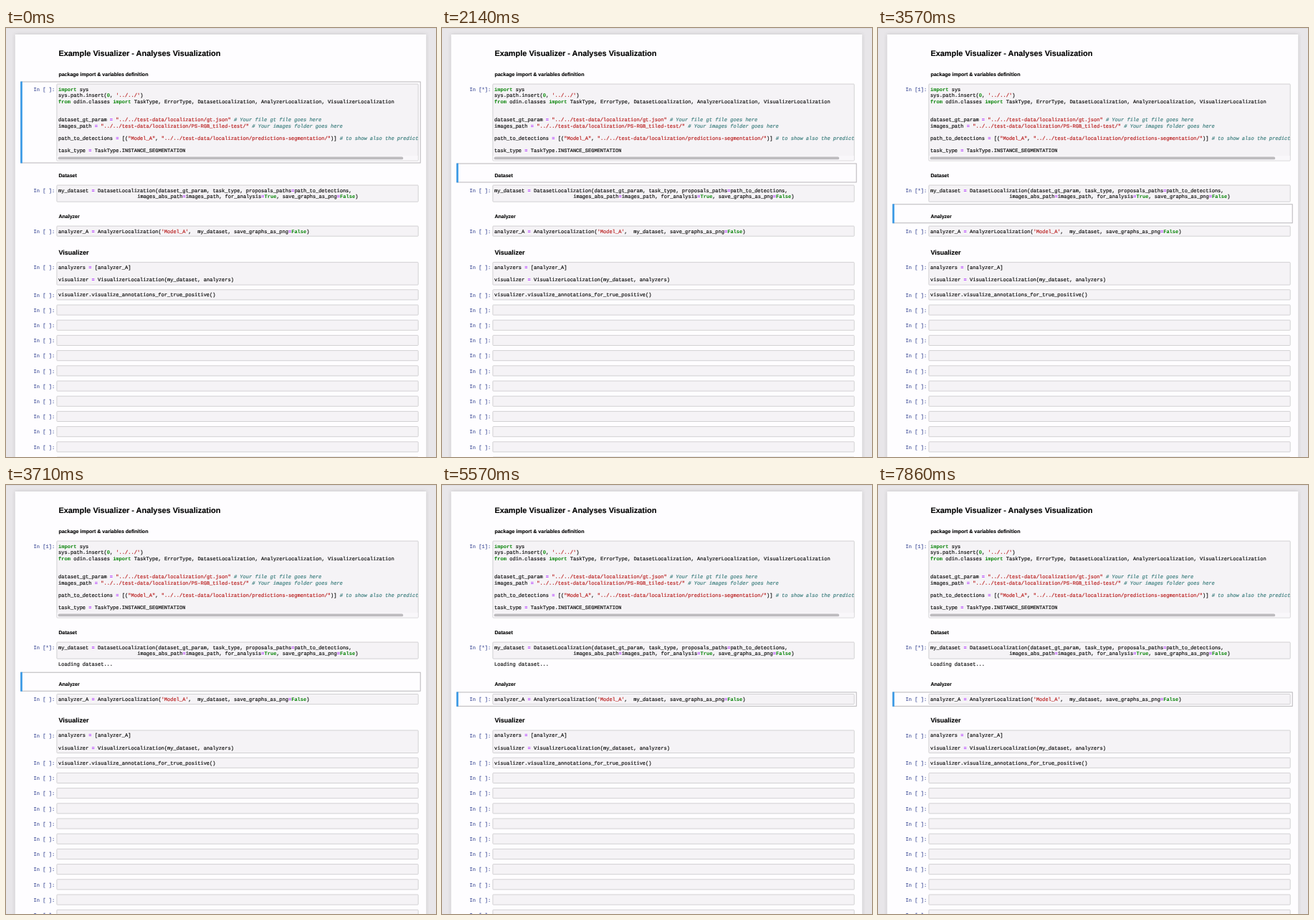
Recreate the animation shown at these times as an HTML page. Size 600 by 598 pixels, loop 8 s.

```html
<!DOCTYPE html>
<html lang="en">
<head>
<meta charset="utf-8">
<title>Notebook</title>
<style>
html, body { margin: 0; width: 100%; height: 100%; overflow: hidden; background: #e8e6e9; }
svg { display: block; width: 600px; height: 598px; }
text { white-space: pre; text-rendering: geometricPrecision; font-kerning: none; }
.code { font: 7.04px "Liberation Mono", monospace; fill: #111; stroke: #111; stroke-width: .2px; }
.prompt { fill: #303f8f; stroke: #303f8f; stroke-width: .08px; }
.head { font: bold 7.04px "Liberation Sans", sans-serif; fill: #000; stroke: #000; stroke-width: .12px; }
.kw { fill: #008000; stroke: none; font-weight: bold; }
.op { fill: #a2f; stroke: none; font-weight: bold; }
.num { fill: #080; stroke: #080; }
.str { fill: #ba2121; stroke: #ba2121; }
.com { fill: #408080; stroke: #408080; font-style: italic; }
.box { fill: #f5f3f6; stroke: #cfcdd0; stroke-width: .9px; }
.frame { fill: #fefdff; stroke: #b0aeb1; stroke-width: .9px; }
.bar { fill: #3b9ae6; stroke: #3b9ae6; stroke-width: .9px; }

.anim { animation: 8s step-end infinite; }
.frame.anim, .bar.anim { animation-name: select; }
.star1 { animation-name: star1; }
.done1 { animation-name: done1; }
.star2 { animation-name: star2; }
.output { animation-name: output; }
.below { animation-name: push; }

@keyframes select {
  0% { y: 75px; height: 113px; }
  23.2% { y: 189px; height: 26px; }
  32.1% { y: 216px; height: 29.4px; }
  37.4% { y: 245.8px; height: 26px; }
  46.3% { y: 261.2px; height: 26px; }
  64.2%, 100% { y: 288.9px; height: 19.4px; }
}
@keyframes star1 { 0% { opacity: 0; } 23.2% { opacity: 1; } 44%, 100% { opacity: 0; } }
@keyframes done1 { 0% { opacity: 0; } 44%, 100% { opacity: 1; } }
@keyframes star2 { 0% { opacity: 0; } 37.4%, 100% { opacity: 1; } }
@keyframes output { 0% { opacity: 0; } 46.3%, 100% { opacity: 1; } }
@keyframes push { 0% { transform: none; } 46.3%, 100% { transform: translateY(15.4px); } }
</style>
</head>
<body>
<svg viewBox="0 0 600 598">
  <defs>
    <filter id="shadow" x="-5%" y="-5%" width="110%" height="110%">
      <feDropShadow dx="0" dy="0" stdDeviation="2.2" flood-color="#575757" flood-opacity=".28"/>
    </filter>
    <clipPath id="clip"><rect x="71" y="70" width="504.2" height="600"/></clipPath>
  </defs>
  <rect width="600" height="1" fill="#dddbde"/>
  <rect x="12.8" y="9" width="573.4" height="620" fill="#fefdff" filter="url(#shadow)"/>
  <rect class="frame anim" x="20.9" width="557.3"/>
  <rect class="bar anim" x="20.7" width="1.6"/>
  <g id="top"></g>
  <g id="below" class="anim below"></g>
</svg>
<script>
const NS = 'http://www.w3.org/2000/svg';
const LEFT = 73.1, LINE = 8.53, CHAR = 4.225, PROMPT = 38.6;
const fixed = document.getElementById('top');
const below = document.getElementById('below');

function add(parent, tag, attrs, text) {
  const el = document.createElementNS(NS, tag);
  for (const key in attrs) el.setAttribute(key, attrs[key]);
  if (text !== undefined) el.textContent = text;
  parent.appendChild(el);
  return el;
}

const TOKEN = /(?<com>#.*)|(?<str>"[^"]*"|'[^']*')|(?<kw>\b(?:import|from|True|False)\b)|(?<op>=)|(?<num>\b\d+\b)|[^#"'=\d\W]+|\W/g;

function codeLine(parent, y, line) {
  const text = add(parent, 'text', { x: LEFT, y, class: 'code', 'clip-path': 'url(#clip)' });
  for (const m of line.matchAll(TOKEN)) {
    const kind = Object.keys(m.groups).find(k => m.groups[k]);
    add(text, 'tspan', kind ? { class: kind } : {}, m[0]);
  }
}

function cell(parent, y, height, lines = []) {
  add(parent, 'rect', { class: 'box', x: 70.9, y, width: 504.3, height, rx: .8 });
  const base = y + 9.5;
  add(parent, 'text', { x: PROMPT, y: base + .3, class: 'code prompt' }, 'In [ ]:');
  lines.forEach((line, i) => line && codeLine(parent, base + i * LINE, line));
}

function heading(parent, y, text, size = 7.04) {
  add(parent, 'text', { x: 73.4, y, class: 'head', style: `font-size:${size}px` }, text);
}

function mark(y, char, name) {
  add(fixed, 'text', { x: PROMPT + 4 * CHAR, y, class: `code prompt anim ${name}` }, char);
}

heading(fixed, 39.2, 'Example Visualizer - Analyses Visualization', 10.95);
heading(fixed, 66.8, 'package import & variables definition');
cell(fixed, 78.1, 106.9, [
  'import sys',
  "sys.path.insert(0, '../../')",
  'from odin.classes import TaskType, ErrorType, DatasetLocalization, AnalyzerLocalization, VisualizerLocalization',
  '', '',
  'dataset_gt_param = "../../test-data/localization/gt.json" # Your file gt file goes here',
  'images_path = "../../test-data/localization/PS-RGB_tiled-test/" # Your images folder goes here',
  '',
  'path_to_detections = [("Model_A", "../../test-data/localization/predictions-segmentation/")] # to show also the predictions',
  '',
  'task_type = TaskType.INSTANCE_SEGMENTATION'
]);
add(fixed, 'rect', { x: 71.4, y: 178, width: 503.3, height: 6.5, fill: '#f9f7fa' });
add(fixed, 'rect', { x: 72.6, y: 179.6, width: 481.6, height: 3.7, rx: 1.85, fill: '#bdbbbe' });
heading(fixed, 208, 'Dataset');
cell(fixed, 219.1, 23.1, [
  'my_dataset = DatasetLocalization(dataset_gt_param, task_type, proposals_paths=path_to_detections,',
  ' '.repeat(26) + 'images_abs_path=images_path, for_analysis=True, save_graphs_as_png=False)'
]);
add(fixed, 'text', { x: LEFT, y: 252.4, class: 'code anim output' }, 'Loading dataset...');
mark(87.9, '*', 'star1');
mark(87.9, '1', 'done1');
mark(228.9, '*', 'star2');

heading(below, 264.9, 'Analyzer');
cell(below, 276.1, 14.1, ["analyzer_A = AnalyzerLocalization('Model_A',  my_dataset, save_graphs_as_png=False)"]);
heading(below, 315.6, 'Visualizer', 9.05);
cell(below, 326.6, 31.5, [
  'analyzers = [analyzer_A]',
  '',
  'visualizer = VisualizerLocalization(my_dataset, analyzers)'
]);
cell(below, 364.8, 14.1, ['visualizer.visualize_annotations_for_true_positive()']);
for (let i = 0; i < 11; i++) cell(below, 386 + i * 21.2, 14.1);
</script>
</body>
</html>
```
